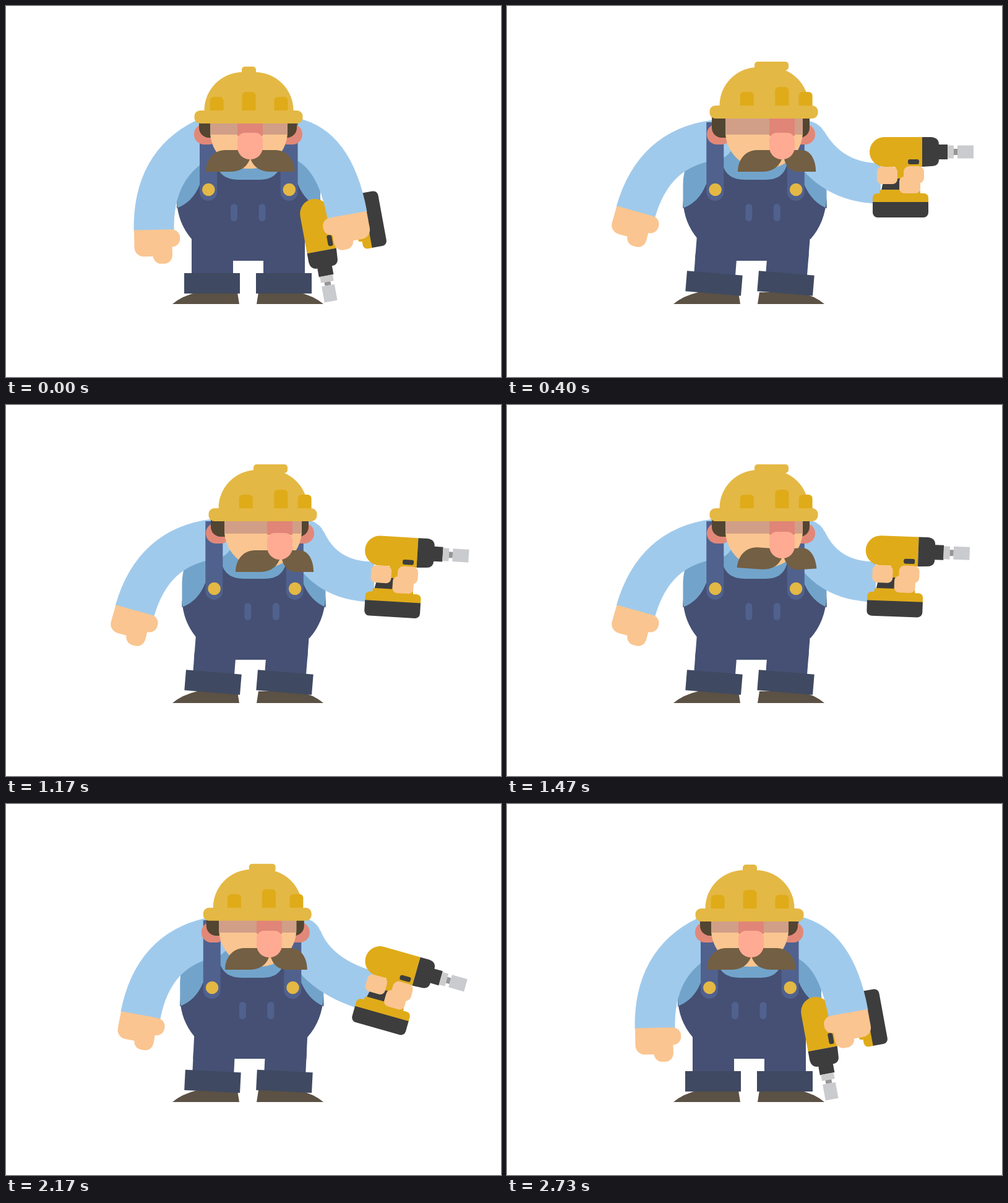
An HTML page with a canvas that plays this animation: 800 px wide and 600 px high, repeating every 3030 ms.

```html
<!DOCTYPE html>
<html lang="en">
<head>
<meta charset="utf-8">
<title>Worker with a drill</title>
<style>
html, body { margin: 0; width: 100%; height: 100%; overflow: hidden; background: #fff }
canvas { display: block }
</style>
</head>
<body>
<canvas id="stage" width="800" height="600"></canvas>
<script>
const LOOP = 3030, DEG = Math.PI / 180;
const SKIN = '#fac590', SLEEVE = '#a0caec', SHIRT = '#72a4cb', NAVY = '#455074', STRAP = '#50618e',
  CUFF = '#3f4961', SHOE = '#5b5144', YELLOW = '#e4b844', GOLD = '#dfab19', BLACK = '#3d3d3d',
  EAR = '#e28878', HAIR = '#524531', BEARD = '#735f43';
const ctx = document.getElementById('stage').getContext('2d');

const mix = (a, b, p) => a + (b - a) * p;

// Smooth step from 0 to 1 between two times.
function ramp(t, from, to) {
  const u = Math.min(1, Math.max(0, (t - from) / (to - from)));
  return u * u * (3 - 2 * u);
}
// 0 at rest, 1 while drilling; a lagging part returns later.
const turn = (t, lag) => ramp(t, 30, 390) - ramp(t, 2020 + lag, 2380 + lag);
// Smooth bump from 0 up to 1 and back.
const bump = (t, peak, width) => ramp(t, peak - width, peak) - ramp(t, peak, peak + width);

function box(color, x, y, w, h, r = 0) {
  ctx.fillStyle = color;
  ctx.beginPath();
  ctx.roundRect(x, y, w, h, r);
  ctx.fill();
}
function path(color, d) {
  ctx.fillStyle = color;
  ctx.fill(new Path2D(d));
}
function dot(color, x, y, r) {
  box(color, x - r, y - r, 2 * r, 2 * r, r);
}
function group(x, y, angle, sx, sy, draw) {
  ctx.save();
  ctx.translate(x, y);
  ctx.rotate(angle * DEG);
  ctx.scale(sx, sy);
  draw();
  ctx.restore();
}

// The sleeve leaves the wrist square to the hand and bends to the shoulder.
function arm(x, y, wx, wy, angle, reach) {
  dot(SLEEVE, x, y, 32);
  ctx.strokeStyle = SLEEVE;
  ctx.lineWidth = 65;
  ctx.beginPath();
  ctx.moveTo(x, y);
  ctx.quadraticCurveTo(wx + reach * Math.sin(angle * DEG), wy - reach * Math.cos(angle * DEG), wx, wy);
  ctx.stroke();
}
function hand() {
  box(SKIN, -32, -1, 61, 43, [0, 0, 0, 15]);
  box(SKIN, 0, -1, 42, 28, [0, 13, 13, 0]);
  box(SKIN, -2, 20, 31, 34, 13);
}

function drill() {
  path(GOLD, 'M18 22H52L46 62H10Z');
  path(BLACK, 'M-1 43H25L24 62H-5Z');
  box(GOLD, -8, 61, 66, 12, 4);
  box(GOLD, -19, 67, 90, 16, [7, 7, 0, 0]);
  box(BLACK, -19, 81, 90, 25, [0, 0, 8, 8]);
  box(GOLD, -24, -24, 85, 48, [24, 0, 0, 24]);
  path(BLACK, 'M61-24H76Q88-23 88-12H102V12H88Q88 23 76 23L61 24Z');
  box('#ccc', 102, -10.5, 10, 21);
  box('#959595', 112, -5, 6, 10);
  box('#c9cbce', 118, -10.5, 26, 21);
  box(BLACK, 38, 12, 18, 8, 3);
}
function grip() {
  box(SKIN, -12, 24, 33, 28, 8);
  box(SKIN, 31, 23, 33, 28, 9);
  box(SKIN, 24, 40, 34, 27, 8);
}

function legs(p, dy) {
  for (const side of [1, -1]) {
    group(391, 482, 0, side, 1, () => path(SHOE, 'M-122 0Q-107-13-82-19H-17L-14 0Z'));
  }
  const lean = .077 * p;
  ctx.save();
  ctx.transform(1, 0, -lean, 1, lean * 462, 0);
  box(NAVY, 300, 368, 183, 44 + dy);
  for (const x of [300, 416]) box(NAVY, x, 400, 67, 35);
  ctx.restore();
  for (const x of [333, 449]) {
    group(x + 1.5 * p, 448.5, 4.7 * p, 1, 1, () => box(CUFF, -45, -16.5, 90, 33));
  }
}
function torso() {
  path(SHIRT, 'M276 327V290C276 240 310 200 392 200C474 200 508 240 508 290V327Z');
  path(NAVY, 'M276 314V327Q302 317 313 289L340 256Q346 281 376 281H410Q438 281 444 256' +
    'L472 289Q484 317 508 327V310Q506 350 482 377H300Q277 350 276 314Z');
}
function straps(p) {
  for (const x of [313, 443.5]) {
    box(STRAP, x, 188, 28, 127, [0, 0, 14, 14]);
    dot(YELLOW, x + 14.3, 297, 10.3);
  }
  for (const x of [363, 408.5]) box(STRAP, x + 13 * p, 320, 11, 28, 5.5);
}

function whisker() {
  path(BEARD, 'M0 0Q-4-15-18-15H-40C-58-15-71 0-71 20H-32Q-8 20 0 0Z');
}
function head(p, bob, droop, shake) {
  const ear = 19 * p, face = 23 * p, nose = 50 * p - shake;
  ctx.save();
  ctx.translate(0, bob);
  for (const x of [304, 439]) box(EAR, x + ear, 191, 40, 33, 16);
  box(HAIR, 312 + ear, 176, 158, 37, [0, 0, 16, 16]);
  box(SKIN, 330 + face, 176, 125, 87, [0, 0, 60, 60]);
  box('#d19f87', 330 + face, 176, 125, 32);
  ctx.translate(0, shake);
  group(394 + nose, 248, -droop, 1, 1, whisker);
  group(395.5 + nose + 2.5 * p, 248, droop, -mix(1, .72, p), 1, whisker);
  box('#e08577', 374 + nose, 176 - shake, 41, 34);
  box('#ffab93', 374 + nose, 205, 41, 43, [12, 12, 20, 20]);
  ctx.restore();
}
function helmet(p, dy) {
  const mid = 392.5 + 23 * p, knob = mix(23, 55, p);
  ctx.save();
  ctx.translate(0, dy - 2 * p);
  box(YELLOW, mid + 12 * p - knob / 2, 98, knob, 14, 5);
  box(YELLOW, mid - 72, 107, 144, 70, [62, 62, 0, 0]);
  box(YELLOW, mid - 88, 169, 175, 21, 9);
  // Three vents spaced around the turning dome.
  for (const i of [-1, 0, 1]) {
    const x = mid + 71 * Math.sin((47 * i + 24 * p) * DEG);
    const h = i ? 22 : 30;
    box(GOLD, x - 11, 169 - h, 22, h, [6, 6, 0, 0]);
  }
  ctx.restore();
}

function draw(t) {
  // The body leads, the arms follow, the tool comes last.
  const p = turn(t, 0), reach = turn(t, 20), swing = turn(t, 48);
  const dip = bump(t, 200, 130) + bump(t, 2320, 130);
  const pop = bump(t, 400, 110) + bump(t, 2490, 110);
  const power = ramp(t, 850, 1000) - ramp(t, 2030, 2130);
  const buzz = Math.cos((t - 1470) / 530 * 9 * Math.PI);

  ctx.fillStyle = '#fff';
  ctx.fillRect(0, 0, 800, 600);

  legs(p, 2 * dip);
  group(8.5 * p, 2 * dip, 0, 1, 1, torso);

  const leftX = mix(239, 208, reach), leftY = mix(363, 333, reach), leftAngle = mix(-1, 16, reach);
  arm(mix(322, 335, reach), mix(214, 217, reach), leftX, leftY, leftAngle, 108);
  group(leftX, leftY, leftAngle, 1, 1, hand);

  const x = mix(551.5, 604, reach) - power * (8.5 - .5 * buzz);
  const y = mix(338.5, 287, reach) - power;
  const aim = mix(79.6, 0, swing), angle = aim + power * (2.75 - .75 * buzz);
  const raised = swing > .5;
  const held = part => group(x, y, angle, 1, raised ? 1 : -1, () => {
    ctx.translate(mix(-12, 6, swing), -51);
    part();
  });
  if (!raised) held(drill);
  arm(mix(464, 484, reach), mix(213, 218, reach), x, y, aim - 90, mix(112, 80, reach));
  if (!raised) group(x, y, angle - 90, -1, 1, hand);

  group(9.3 * p, 2 * dip, 0, 1, 1, () => straps(p));
  if (raised) {
    held(drill);
    held(grip);
  }
  head(p, 4 * dip, 14 * dip - power * 2 * (1 + buzz), power * (1 - buzz));
  helmet(p, 11 * dip - 6 * pop);
}

const start = performance.now();
function tick() {
  draw((performance.now() - start) % LOOP);
  requestAnimationFrame(tick);
}
tick();
</script>
</body>
</html>
```
